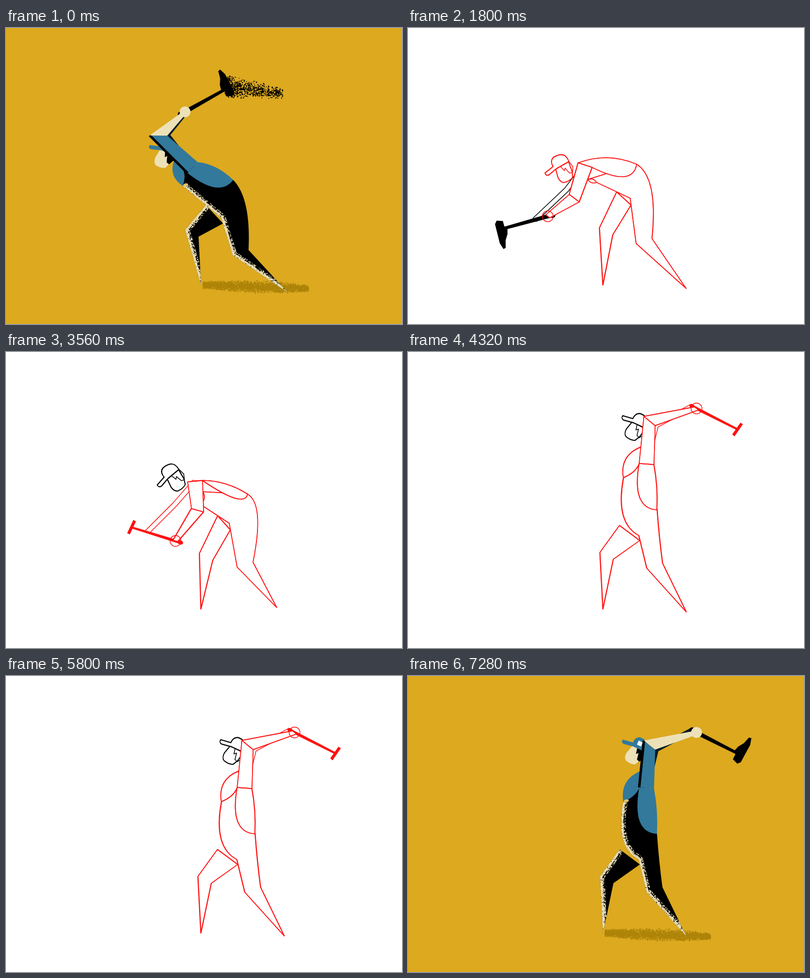
Animation of 800x600 px, one loop 7360 ms. Source, as an HTML page with a canvas:

```html
<!DOCTYPE html>
<html lang="en">
<head>
<meta charset="utf-8">
<title>Hammer swing</title>
<style>
  html, body { margin: 0; height: 100%; overflow: hidden; background: #dca91f; }
  canvas { display: block; }
</style>
</head>
<body>
<canvas id="stage" width="800" height="600"></canvas>
<script>
const ctx = document.getElementById('stage').getContext('2d');
const BLUE = '#32799b', CREAM = '#ede1b8', DARK = '#031b26', RED = '#f11';
const FAR_FOOT = [394, 521];

// Joints of the key poses. head: x, y, degrees. hammer: butt x, y, degrees, far hand's grip.
// The outline of the body is derived from these in buildFigure.
const reach = {
  head: [309, 285, -28], hammer: [292, 379, 164.5, 38],
  shoulder: [358, 278], elbow: [336, 345], farElbow: [320, 328],
  bib: [381, 313], waist: [462, 276], crotch: [449, 345],
  knee: [461, 437], foot: [562, 528], farKnee: [387, 405]
};
const haul = {
  head: [336, 255, -38], hammer: [352, 386, 197.3, 70],
  shoulder: [382, 262], elbow: [387, 321], farElbow: [340, 310],
  bib: [393, 309], waist: [488, 288], crotch: [451, 347],
  knee: [467, 436], foot: [547, 518], farKnee: [391, 408]
};
const overhead = {
  head: [427, 174, -20], hammer: [407, 99, 355, 50],
  shoulder: [470, 206], elbow: [416, 180], farElbow: [452, 155],
  bib: [436, 260], waist: [507, 308], crotch: [476, 364],
  knee: [490, 445], foot: [570, 540], farKnee: [403, 403]
};
const wound = {
  head: [460, 150, 27], hammer: [574, 110, 387, 0],
  shoulder: [482, 227], elbow: [488, 140], farElbow: [501, 149],
  bib: [435, 255], waist: [503, 320], crotch: [466, 372],
  knee: [482, 438], foot: [562, 527], farKnee: [388, 406]
};
const whip = {
  head: [319, 254, 18], hammer: [353, 175, 330.6, 12],
  shoulder: [377, 283], elbow: [308, 218], farElbow: [325, 217],
  bib: [357, 320], waist: [459, 308], crotch: [435, 385],
  knee: [458, 460], foot: [569, 536], farKnee: [362, 409]
};

const lerp = (a, b, k) => a.map((v, i) => v + (b[i] - v) * k);
const mix = (a, b, k) => Object.fromEntries(
  Object.keys(a).map(part => [part, lerp(a[part], b[part], k)]));

const stretch = { ...wound, hammer: [584, 102, 365, 0] };
const settle = { ...wound, hammer: [586, 112, 382, 0] };
const swing = { ...mix(whip, reach, .5), hammer: [270, 245, 240, 10],
  elbow: [309, 277], farElbow: [308, 262] };
const strike = { ...reach, head: [309, 291, -32], hammer: [294, 400, 152, 38],
  elbow: [336, 353], farElbow: [318, 340] };

const keys = [[0, reach], [4, haul], [8, overhead], [10, stretch], [11, settle],
  [12, wound], [13, whip], [15, swing], [17, strike]];

function poseAt(step) {
  const n = Math.max(1, keys.findIndex(([at]) => at >= step));
  const [from, a] = keys[n - 1], [to, b] = keys[n];
  return mix(a, b, (step - from) / (to - from));
}

// Timing: lift, hang, then a fast strike that is held
const LOOP = 7360, SKETCH_FROM = 1480, SKETCH_TO = 5880;
const swingStarts = [-1160, 320, 1800, 3240, 4720, 6200];

function stepAt(t) {
  const start = swingStarts.findLast(s => s <= t);
  let phase = t - start;
  if (start === 1800 && phase >= 360) phase += 40; // this swing runs 40 ms short
  if (phase < 920) return Math.min(10, Math.floor(phase / 80));
  if (phase < 1160) return phase < 1080 ? 11 : 12;
  return Math.min(17, 13 + Math.floor((phase - 1160) / 40));
}

// Points and paths
const add = ([x, y], dx, dy) => [x + dx, y + dy];
const unit = ([x0, y0], [x1, y1]) => {
  const len = Math.hypot(x1 - x0, y1 - y0);
  return [(x1 - x0) / len, (y1 - y0) / len];
};
const poly = (...points) => new Path2D(`M${points.join('L')}Z`);
const line = (...points) => new Path2D(`M${points.join('L')}`);

function alongHammer([x, y, degrees], distance) {
  const a = degrees * Math.PI / 180;
  return [x + distance * Math.cos(a), y + distance * Math.sin(a)];
}

function buildFigure(p) {
  const { shoulder, elbow, bib, waist, crotch, knee, foot, farKnee } = p;
  const hand = alongHammer(p.hammer, 10);

  // Sleeve with a mitred elbow
  const u = unit(shoulder, elbow), f = unit(elbow, hand);
  const sx = 15 * u[1], sy = -15 * u[0];
  const turn = 1 + u[0] * f[0] + u[1] * f[1];
  const ex = 12 * (u[1] + f[1]) / turn, ey = -12 * (u[0] + f[0]) / turn;
  const top = add(shoulder, -sx, -sy), armpit = add(shoulder, sx, sy);
  const under = add(elbow, ex, ey), over = add(elbow, -ex, -ey);

  // The more the worker stoops, the rounder the back and hip; upright, the belly swells
  const lean = waist[0] - shoulder[0] - 25;
  const swell = .38 * Math.max(0, crotch[1] - bib[1] - crotch[0] + bib[0]);
  const kneeBack = add(knee, 32, -10);
  const hip = add(lerp(waist, kneeBack, .5), lean * .36, -lean * .6);
  const belly = add(lerp(bib, crotch, .5), -swell, swell);
  const back = add(lerp(top, waist, .5),
    (waist[1] - top[1]) * .06, (top[0] - waist[0]) * .2);
  const side = add(lerp(waist, armpit, .5), lean * .85 - 30, 44);

  const bibTop = lerp(armpit, under, .35), mid = lerp(bibTop, bib, .5);
  const bx = .4 * (bib[1] - bibTop[1]), by = .4 * (bibTop[0] - bib[0]);
  const groin = lerp(crotch, belly, .8);
  const path = d => new Path2D(d);
  return {
    hand, under, over,
    armEdge: line(armpit, under),
    sleeve: poly(top, armpit, under, over),
    torso: path(`M${top}Q${back} ${waist}Q${side} ${armpit}Z`),
    chest: path(`M${bibTop}Q${add(mid, -bx, -by)} ${bib}Q${add(mid, bx, by)} ${bibTop}Z`),
    body: path(`M${bibTop}L${waist}Q${hip} ${kneeBack}L${foot}L${knee}L${crotch}Q${belly} ${bib}Z`),
    bodyEdge: path(`M${bib}Q${belly} ${crotch}L${knee}L${foot}`),
    farLeg: poly(groin, farKnee, FAR_FOOT, add(farKnee, 27, 14), lerp(crotch, knee, .15)),
    farLegEdge: line(groin, farKnee, FAR_FOOT),
    farArm: line(shoulder, p.farElbow, alongHammer(p.hammer, p.hammer[3]))
  };
}

// Dry-brush textures
function random(seed) {
  return () => (seed = seed * 16807 % 2147483647) / 2147483647;
}
function dust(c, color, count, seed, place) {
  const rnd = random(seed);
  c.fillStyle = color;
  for (let i = 0; i < count; i++)
    c.fillRect(...place(rnd), 1 + rnd() * 1.6, 1 + rnd() * 1.6);
}
function grain(color, count, seed) {
  const tile = document.createElement('canvas');
  tile.width = tile.height = 256;
  dust(tile.getContext('2d'), color, count, seed, rnd => [rnd() * 256, rnd() * 256]);
  return ctx.createPattern(tile, 'repeat');
}
const denseCream = grain(CREAM, 42000, 11), sparseCream = grain(CREAM, 11000, 23);

function drawShadow() {
  dust(ctx, '#ad8409', 3000, 37, rnd => {
    const k = rnd(), thickness = 7 + 6 * Math.sin(Math.PI * k);
    return [397 + 213 * k, 520 + 7 * k + (rnd() + rnd() - 1) * thickness];
  });
}

function drawTrail(step) {
  dust(ctx, '#000', 800, 41 + step, rnd => {
    const k = .43 * rnd() ** 1.5, spread = 24 - 30 * k;
    const [x, y] = alongHammer(poseAt(step - k).hammer, 107);
    return [x + (rnd() - .5) * 12, y - 5 + (rnd() + rnd() - 1) * spread];
  });
}

// Painting: flat colour, or white paper with red pen lines
let sketch = false, wobble = random(1);

function stroke(path, style, width) {
  ctx.strokeStyle = style;
  ctx.lineWidth = width;
  ctx.stroke(path);
}

function fill(path, color) {
  ctx.fillStyle = color;
  ctx.fill(path);
}

function paint(path, color, ink = RED) {
  fill(path, sketch ? '#fff' : color);
  if (!sketch) return;
  stroke(path, ink, 1.7);
  ctx.save();
  ctx.translate(wobble() * 2 - 1, wobble() * 2 - 1);
  stroke(path, ink, 1);
  ctx.restore();
}

function paintLit(shape, edge) {
  paint(shape, '#000');
  if (sketch) return;
  ctx.save();
  ctx.clip(shape);
  stroke(edge, sparseCream, 18);
  stroke(edge, denseCream, 9);
  ctx.restore();
}

function inFrame([x, y, degrees], draw) {
  ctx.save();
  ctx.translate(x, y);
  ctx.rotate(degrees * Math.PI / 180);
  draw();
  ctx.restore();
}

const face = new Path2D('M-10-4L-14 14Q-14 25-8 28Q2 31 12 27L17 16L20-5Z');
const hair = new Path2D('M1-5L4 7L8 3L11 16L17 18L23 8L21-6Z');
const cap = new Path2D('M-33-7Q-34 0-27 0L-8-4L21-5Q22-18 17-22Q10-28-3-27Q-13-24-12-11Z');
const maul = new Path2D('M117 13L112 19L100 15V4L95-2L98-13L105-24L109-39L114-40L118-27Z');
const mallet = new Path2D('M98 20L104 22L108-20L102-21Z');
const handle = new Path2D('M0-4.5L102-3V3L0 4.5ZM6 0A6 6 0 1 1-6 0A6 6 0 1 1 6 0Z');

function drawHead(at, ink, showMark) {
  inFrame(at, () => {
    paint(face, CREAM, ink);
    if (sketch) stroke(hair, ink, 1.5);
    else fill(hair, '#000');
    paint(cap, BLUE, ink);
    if (showMark && !sketch) {
      ctx.fillStyle = '#fff';
      ctx.fillRect(-3, -20, 9, 9);
    }
  });
}

function drawHammer(at, ink, light) {
  inFrame(at, () => {
    if (light) ctx.scale(1, .7);
    fill(handle, ink);
    fill(light ? mallet : maul, ink);
  });
}

function drawFarArm(path, ink) {
  ctx.lineJoin = 'miter';
  stroke(path, sketch ? ink : DARK, 11);
  if (sketch) stroke(path, '#fff', 8);
  ctx.lineJoin = 'round';
}

function drawForearm({ under, over, hand }) {
  const [dx, dy] = unit(over, under).map(v => v * 5);
  paint(poly(over, under, add(hand, dx, dy), add(hand, -dx, -dy)), CREAM);
  const fist = new Path2D();
  fist.arc(...hand, 11, 0, 7);
  if (sketch) stroke(fist, RED, 1.4);
  else paint(fist, CREAM);
}

function drawWorker(step) {
  const pose = poseAt(step), figure = buildFigure(pose);
  const blackHammer = step < 2 || step > 13;
  const toolInk = !sketch || blackHammer ? '#000' : RED;
  const facesUs = step < 3 || step > 9 && step !== 13;

  paintLit(figure.farLeg, figure.farLegEdge);
  drawFarArm(figure.farArm, toolInk);
  drawHead(pose.head, blackHammer ? RED : '#000', facesUs);
  paintLit(figure.body, figure.bodyEdge);
  paint(figure.torso, BLUE);
  paint(figure.chest, BLUE);
  if (!sketch) {
    const buckle = new Path2D();
    buckle.ellipse(...add(pose.bib, 6, -2), 5, 2.7, -.2, 0, 7);
    fill(buckle, '#e6c469');
  }
  paint(figure.sleeve, BLUE);
  if (!sketch) stroke(figure.armEdge, '#000', 5);
  drawHammer(pose.hammer, toolInk, sketch && !blackHammer);
  drawForearm(figure);
}

function render(now) {
  const t = now % LOOP, step = stepAt(t);
  sketch = t >= SKETCH_FROM && t < SKETCH_TO;
  wobble = random(step * 97 + 5);
  ctx.lineJoin = 'round';
  ctx.fillStyle = sketch ? '#fff' : '#dca91f';
  ctx.fillRect(0, 0, 800, 600);
  if (!sketch) {
    drawShadow();
    if (step > 12 && step < 17) drawTrail(step);
  }
  drawWorker(step);
}

const begin = performance.now();
function tick() {
  render(performance.now() - begin);
  requestAnimationFrame(tick);
}
tick();
</script>
</body>
</html>
```
